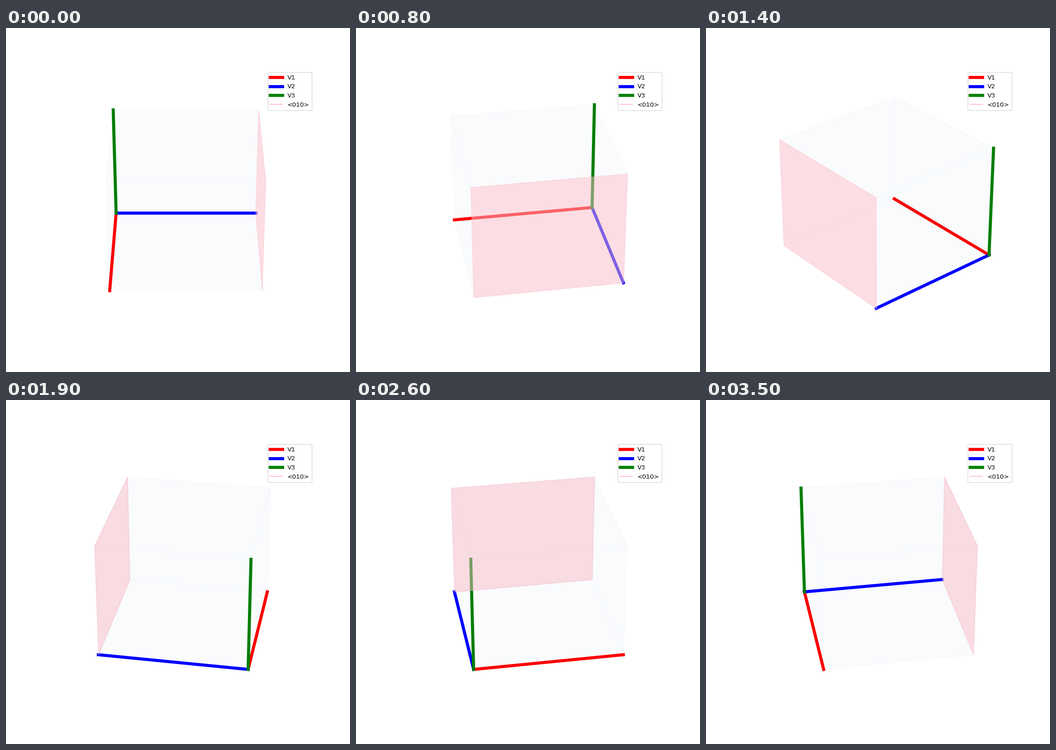
These frames come from a looping animation (748x748 px, 3600 ms). A matplotlib script:

```python
import itertools

import matplotlib.pyplot as plt
import numpy as np
from matplotlib.animation import FuncAnimation
from mpl_toolkits.mplot3d.art3d import Poly3DCollection

SIZE, DPI = 748, 96
FRAMES, INTERVAL = 36, 100
ELEV = 30
PAD = 25 / 24  # axis range around the unit cell


def cell_face(axis, level):
    """Corners of the unit cell face where the given axis equals level."""
    square = [(0, 0), (1, 0), (1, 1), (0, 1)]
    return np.insert(np.array(square, float), axis, level, axis=1)


def add_faces(ax, faces, color, alpha):
    ax.add_collection3d(Poly3DCollection(
        faces, facecolors=[(color, alpha)], edgecolors=[(color, alpha)],
        linewidths=1))


def centred(span):
    return 0.5 - span / 2, 0.5 + span / 2


plt.rcParams["font.family"] = "DejaVu Sans"
fig = plt.figure(figsize=(SIZE / DPI, SIZE / DPI), dpi=DPI)
ax = fig.add_subplot(projection="3d")
ax.set_axis_off()

# Cell vectors
for i, (vec, color) in enumerate(zip(np.eye(3), ("red", "blue", "green"))):
    ax.plot(*([0, v] for v in vec), color=color, lw=5, label=f"V{i + 1}")
ax.plot([], [], [], color="pink", lw=1.5, label="<010>")

# Faint cell with the highlighted lattice plane
cell = [cell_face(a, k) for a, k in itertools.product(range(3), (0, 1))]
add_faces(ax, cell, "tab:blue", 0.01)
add_faces(ax, [cell_face(1, 1)], "pink", 0.5)

ax.set_xlim(*centred(1.1 * PAD))
ax.set_ylim(*centred(1.1 * PAD))
ax.set_zlim(*centred(PAD))
ax.set_box_aspect((4, 4, 3))
ax.legend(loc="upper right", fontsize=10)


def update(i):
    ax.view_init(elev=ELEV, azim=i * 360 / FRAMES)
    return []


anim = FuncAnimation(fig, update, frames=FRAMES, interval=INTERVAL,
                     repeat=True, repeat_delay=0, blit=False)
plt.show()
```
